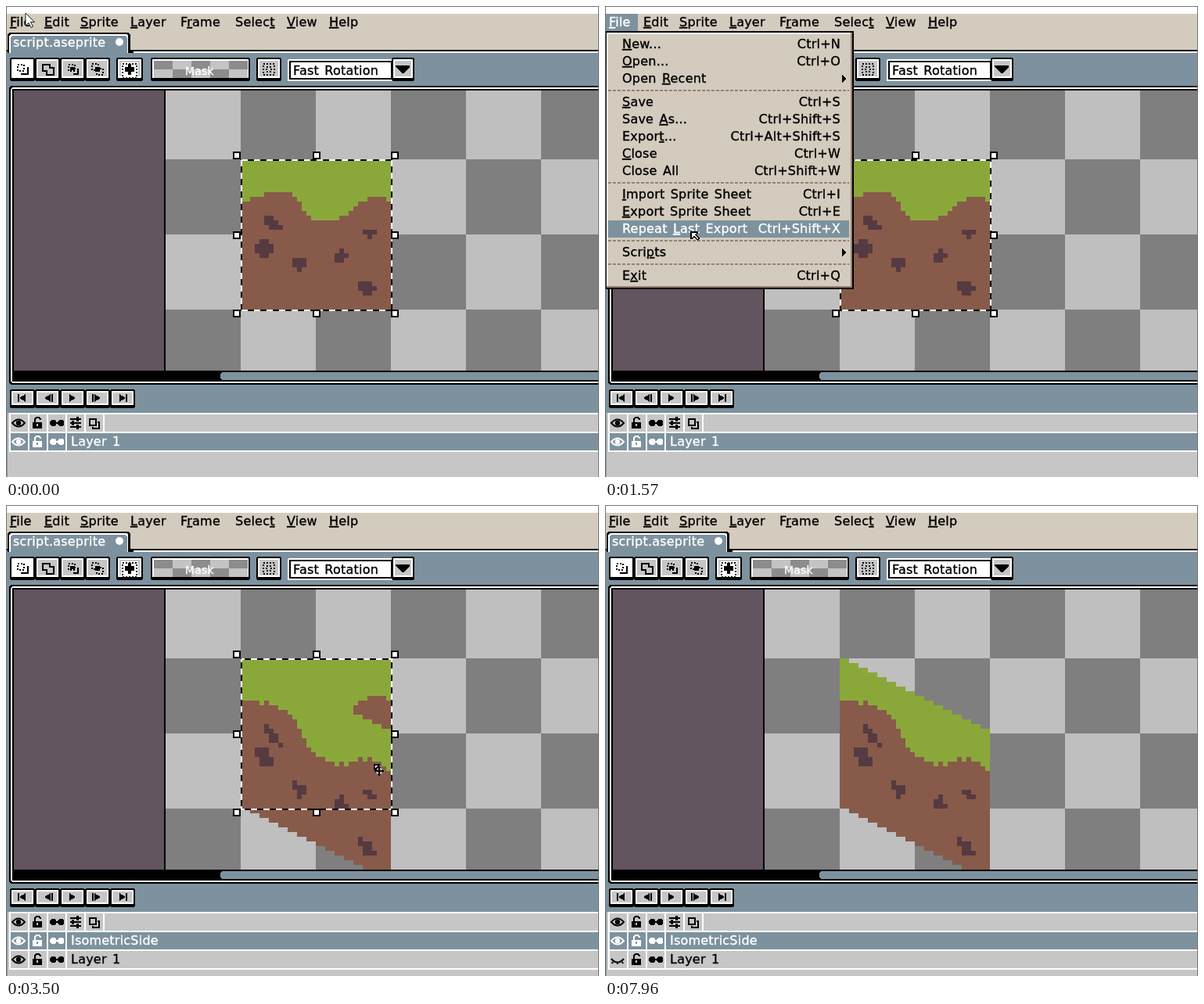
Animation of 758x602 px, one loop 9710 ms. Source, as an HTML page:

```html
<!DOCTYPE html>
<html lang="en">
<head>
<meta charset="utf-8">
<title>Isometric script</title>
<style>
html, body { margin: 0; width: 100%; height: 100%; overflow: hidden; background: #7d929e; }
svg { display: block; width: 758px; height: 602px; shape-rendering: crispEdges; }
text {
  font: 16px "DejaVu Sans", sans-serif; letter-spacing: .22px; word-spacing: 2px;
  white-space: pre; fill: #000; stroke: #000; stroke-width: .35px;
}
.w, .hot text { fill: #fff; stroke: #fff; }
.u { text-decoration: underline; }
.item rect { fill: none; }
.item path { fill: #000; }
.hot rect { fill: #7d929e; }
.hot path { fill: #fff; }
.smooth { shape-rendering: geometricPrecision; }
.cell { fill: #c6c6c6; }
.active .cell { fill: #7d929e; }
.cell.over { fill: #dedede; }
.active .cell.over { fill: #9bb0bb; }
</style>
</head>
<body>
<svg id="stage" viewBox="0 0 758 602" xmlns="http://www.w3.org/2000/svg"></svg>
<script>
const LOOP = 9710;
const BLUE = '#7d929e', BEIGE = '#d3cbbe', GRAY = '#c6c6c6', BROWN = '#968275';
const GRASS = '#8aa83a', DIRT = '#885a4a', STONE = '#563a41';

// Moments of the story, in ms
const MENU = 400, SUBMENU = 2010, RUN = 3370, DESELECT = 5240, HIDE = 7220;

const rect = (x, y, w, h, fill, more = '') =>
  `<rect x="${x}" y="${y}" width="${w}" height="${h}" fill="${fill}" ${more}/>`;
const path = (d, fill = '#000', more = '') => `<path d="${d}" fill="${fill}" ${more}/>`;
const line = (d, color = '#000', more = '') =>
  path(d, 'none', `stroke="${color}" stroke-width="2" ${more}`);
const group = (id, body, more = '') => `<g id="${id}" ${more}>${body}</g>`;
const range = n => [...Array(n).keys()];
const smooth = u => u * u * (3 - 2 * u);

// Value at k along key points [k, ...values]
function along(keys, k, ease = u => u) {
  const i = keys.findIndex(p => p[0] > k);
  if (i < 0) return keys.at(-1).slice(1);
  const a = keys[i - 1], b = keys[i], u = ease((k - a[0]) / (b[0] - a[0]));
  return a.slice(1).map((v, j) => v + (b[j + 1] - v) * u);
}

// "&" marks the underlined letter
function label(x, y, str, more = '') {
  const body = str.replace(/&(.)/, '<tspan class="u">$1</tspan>');
  return `<text x="${x}" y="${y}" ${more}>${body}</text>`;
}

const button = (x, y, w, h, face = GRAY) =>
  rect(x, y, w, h, '#000', 'rx="3"') + rect(x + 2, y + 2, w - 4, h - 6, '#fff') +
  rect(x + 4, y + 4, w - 8, h - 10, face);

const dots = (x, y, s) => rect(x + 1, y + 1, s - 2, s - 2, 'none',
  'stroke="#000" stroke-width="2" stroke-dasharray="2 2"');

function topBar() {
  const names = [[5, '&File'], [49, '&Edit'], [95, '&Sprite'], [159, '&Layer'],
    [223, 'F&rame'], [293, 'Selec&t'], [359, '&View'], [413, '&Help']];
  return rect(0, 0, 758, 10, '#fff') + rect(0, 10, 758, 46, BEIGE) +
    rect(0, 56, 758, 2, '#000') + rect(160, 58, 598, 2, '#fff') +
    names.map(([x, s]) => label(x, 26, s)).join('') +
    path('M2 60V36l2-2h152l3 3v21h4v2z') +
    path('M4 60V38l2-2h148l2 2v22z', '#fff') + path('M6 62V40l2-2h144l3 3v21z', BLUE) +
    label(9, 52, 'script.aseprite', 'class="w"') +
    '<circle cx="145" cy="46" r="5" fill="#fff" class="smooth"/>';
}

function toolBar() {
  const mask = range(10).map(i => {
    const c = i % 5, r = Math.floor(i / 5);
    return rect(189 + c * 24, 70 + r * 11, 24, 11, (c + r) % 2 ? '#c4c4c4' : '#8c8c8c');
  });
  return range(4).map(i => button(5 + 32 * i, 66, 32, 30, i ? GRAY : '#fff')).join('') +
    dots(14, 74, 10) + line('M28 78v9h-9') +
    line('M47 75h9v4h5v9h-9v-5h-5z') +
    dots(79, 74, 10) + line('M86 87h6v-7') + rect(82, 78, 6, 4, '#000') +
    dots(109, 73, 10) + dots(115, 79, 10) + rect(114, 78, 6, 6, '#000') +
    button(141, 66, 34, 30) + rect(147, 72, 22, 18, '#fff') + dots(148, 73, 20) +
    path('M156 74h4v4h4v6h-4v4h-4v-4h-4v-6h4z') +
    button(185, 66, 127, 30) + mask.join('') +
    label(229, 88, 'Mask', 'class="w" style="font-size:14px"') +
    button(320, 66, 32, 30) + dots(328, 73, 16) + dots(332, 77, 8) +
    rect(360, 68, 136, 28, '#fff', 'rx="2"') + rect(362, 70, 132, 24, '#000') +
    rect(364, 72, 128, 20, '#fff') + label(367, 88, 'Fast Rotation') +
    button(493, 66, 29, 30) + path('M498 76h18v2l-8 8h-2l-8-8z');
}

const CELL = 6, SIZE = 32, LEFT = 300, TOP = 196;
// Rolling grass edge: column, depth
const HILLS = [[0, 9], [6, 7], [9, 7], [16, 13], [19, 13], [28, 8], [30, 8], [31, 9]];
// Ellipses: centre, radii, slant
const STONES = [[6.15, 13, 1.6, 1.6, .8], [4.5, 18.5, 2, 2, 0], [12, 21.9, 1.6, 1.25, 0],
  [20.9, 20.15, 1.3, 1.35, 0], [27, 15.2, 1.3, 1, 0], [26.4, 27, 1.8, 1.34, .3]];

const isStone = (c, r) => STONES.some(([x, y, a, b, s]) =>
  ((c - x - s * (r - y)) / a) ** 2 + ((r - y) / b) ** 2 < 1);

function soil(slope) {
  return range(SIZE).map(c => {
    const drop = Math.floor(c * slope), depth = Math.round(along(HILLS, c, smooth)[0]);
    const bar = (r, h, fill) =>
      rect(LEFT + c * CELL, TOP + (r + drop) * CELL, CELL, h * CELL, fill);
    return bar(0, depth, GRASS) + bar(depth, SIZE - depth, DIRT) +
      range(SIZE).map(r => isStone(c, r) ? bar(r, 1, STONE) : '').join('');
  }).join('');
}

function editor() {
  const checks = range(24).map(i => {
    const c = i % 6, r = Math.floor(i / 6);
    return rect(204 + c * 96, 100 + r * 96, 96, 96, (c + r) % 2 ? '#7f7f7f' : '#bfbfbf');
  });
  return path('M4 104l2-2H758V484H6l-2-2z') + path('M6 106l2-2H758V482H8l-2-2z', '#fff') +
    rect(8, 106, 750, 374, '#000') +
    '<clipPath id="view"><rect x="10" y="108" width="748" height="358"/></clipPath>' +
    '<g clip-path="url(#view)">' + rect(10, 108, 192, 358, '#62555f') + checks.join('') +
    group('flat', soil(0)) + group('slanted', soil(.5)) + '</g>' +
    path('M274 470l2-2H758v10H276l-2-2z', BLUE);
}

function selection() {
  const knobs = [295, 397, 497].flatMap(x => [191, 293, 393].map(y =>
    x === 397 && y === 293 ? '' : rect(x - 5, y - 5, 10, 10, '#000') + rect(x - 3, y - 3, 6, 6, '#fff')));
  return line('M301 197H493V389H301z') +
    line('M301 197H493V389M301 197V389H493', '#fff', 'id="ants" stroke-dasharray="8 8"') + knobs.join('');
}

const eye = (y, c) => '<g class="smooth">' +
  line(`M8 ${y}q8-9 16 0q-8 9-16 0z`, c) + `<circle cx="16" cy="${y}" r="3.2" fill="${c}"/></g>`;
const lash = (y, c) => line(`M8 ${y - 1}q8 9 16 0M10 ${y + 3}l-1 2M16 ${y + 4}v2M22 ${y + 3}l1 2`, c, 'class="smooth"');
const lock = (y, c) => rect(34, y - 1, 12, 8, c) +
  line(`M37 ${y - 1}v-4l2-2h3l2 2v1`, c) + rect(39, y + 1, 2, 3, c === '#fff' ? BLUE : GRAY);
const link = (y, c) => [56, 66].map(x => path(`M${x} ${y - 2}l2-2h4l2 2v4l-2 2h-4l-2-2z`, c)).join('') +
  rect(62, y - 1, 6, 2, c);

function layer(id, y, name, active) {
  const c = active ? '#fff' : '#000', mid = y + 11;
  const cells = range(4).map(i =>
    `<rect class="cell" x="${6 + 24 * i}" y="${y}" width="${i < 3 ? 22 : 680}" height="22"/>`);
  return group(id, rect(4, y - 2, 754, 26, '#fff') + cells.join('') +
    `<g class="open">${eye(mid, c)}</g><g class="shut">${lash(mid, c)}</g>` +
    lock(mid, c) + link(mid, c) + label(83, y + 16, name, active ? 'class="w"' : ''),
    active ? 'class="active"' : '');
}

// Five transport buttons: arrow plus a bar, mirrored around plain play
function transport() {
  return range(5).map(i => {
    const x = 21 + 32 * i, dir = i < 2 ? -1 : 1;
    const bar = i === 2 ? '' : rect(x + dir * (i % 4 ? -6 : 5) - 1, 496, 2, 10, '#000');
    return button(x - 16, 490, 32, 24) + path(`M${x - 4 * dir} 496l${8 * dir} 5l${-8 * dir} 5z`) + bar;
  }).join('');
}

function timeline() {
  const sliders = range(3).map(i =>
    line(`M82 ${528 + 5 * i}h14`) + rect(i === 1 ? 84 : 90, 525 + 5 * i, 3, 6, '#000'));
  return transport() + rect(2, 520, 756, 82, GRAY) +
    [520, 544].map(y => rect(4, y, 754, 2, '#fff')).join('') +
    range(6).map(i => rect(4 + 24 * i, 520, 2, 26, '#fff')).join('') +
    eye(533, '#000') + lock(533, '#000') + link(533, '#000') + sliders.join('') +
    line('M107 528h8v8h-8zM117 532h2v8h-8v-2') +
    layer('only', 546, 'Layer 1', true) +
    group('both', layer('side', 546, 'IsometricSide', true) + layer('base', 570, 'Layer 1', false));
}

// 0 is a separator, ">" opens a submenu
const FILE_ITEMS = [['&New...', 'Ctrl+N'], ['&Open...', 'Ctrl+O'], ['Open &Recent', '>'], 0,
  ['&Save', 'Ctrl+S'], ['Save &As...', 'Ctrl+Shift+S'], ['Expor&t...', 'Ctrl+Alt+Shift+S'],
  ['&Close', 'Ctrl+W'], ['Close All', 'Ctrl+Shift+W'], 0,
  ['&Import Sprite Sheet', 'Ctrl+I'], ['&Export Sprite Sheet', 'Ctrl+E'],
  ['Repeat &Last Export', 'Ctrl+Shift+X'], 0, ['Scri&pts', '>'], 0, ['E&xit', 'Ctrl+Q']];
const SCRIPT_ITEMS = [['square-to-isometric-front'], ['square-to-isometric-side'],
  ['square-to-isometric-tile'], 0, ['&Open Scripts Folder'], ['&Rescan Scripts Folder', 'F5']];

function popup(id, x, y, w, h, items) {
  let row = y + 6;
  const right = x + w - 17;
  const body = items.map(item => {
    if (!item) {
      row += 8;
      return line(`M${x + 4} ${row - 4}H${x + w - 6}`, BROWN, 'stroke-dasharray="4 2"');
    }
    const [name, key = ''] = item, top = row;
    row += 22;
    return `<g class="item" data-top="${top}">` +
      `<rect x="${x + 4}" y="${top}" width="${w - 10}" height="22"/>` + label(x + 22, top + 16, name) +
      (key === '>' ? `<path d="M${right + 2} ${top + 6}l5 5l-5 5z"/>`
        : label(right, top + 16, key, 'text-anchor="end"')) + '</g>';
  });
  return group(id, rect(x, y, w, h, '#000') + rect(x + 2, y + 2, w - 4, h - 4, BROWN) +
    rect(x + 2, y + 2, w - 6, h - 6, '#fff') + rect(x + 4, y + 4, w - 8, h - 8, BEIGE) + body.join(''));
}

function pointers() {
  const arrow = path('M0 0h10v2l-2 3l4 4l-3 3l-4-4l-3 2h-2z') + path('M2 2h6l-2 3l4 4l-1 1l-4-4l-3 2z', '#fff');
  const cross = path('M7 2l3 3h-2v3h3v-2l3 3l-3 3v-2h-3v3h2l-3 3l-3-3h2v-3h-3v2l-3-3l3-3v2h3v-3h-2z',
    '#000', 'stroke="#fff" paint-order="stroke" class="smooth"');
  return group('pointer',
    group('system', path('M0 0v16l4-3.5l3 6l2.5-1.2l-3-5.8h5z', '#fff', 'stroke="#222" class="smooth"')) +
    group('arrow', arrow) + group('move', cross + path('M0 0h8v2l-3 2l-1 4h-4z') + path('M2 2h3l-3 4z', '#fff')));
}

document.getElementById('stage').innerHTML =
  rect(0, 0, 758, 602, BLUE) + topBar() + toolBar() + editor() + group('select', selection()) + timeline() +
  group('menu', rect(0, 34, 758, 22, BEIGE) +
    rect(1, 10, 41, 22, BLUE) + label(5, 26, '&File', 'class="w"') +
    popup('file', 0, 32, 318, 330, FILE_ITEMS)) +
  popup('scripts', 316, 298, 270, 130, SCRIPT_ITEMS) +
  rect(.5, .5, 757, 602, 'none', 'stroke="#777"') + pointers();

// Pointer stops: step, x, y
const STOPS = [[0, 25, 9], [6, 28, 24], [9, 101, 219], [13, 112, 311], [15, 114, 314],
  [17, 221, 323], [20, 470, 331], [27, 470, 331], [32, 111, 585], [33, 112, 590],
  [34, 229, 485], [36, 268, 432], [41, 268, 432], [42, 20, 592], [43, 20, 620],
  [48, 0, 620], [51, 10, 576], [56, 10, 576], [57, 213, 592], [60, 350, 604]];

const $ = id => document.getElementById(id);
const all = (q, fn) => document.querySelectorAll(q).forEach(fn);
const show = (el, on) => { el.style.display = on ? '' : 'none'; };

function update(t) {
  // The screen refreshes about every 133 ms
  const step = Math.floor(t / 133 + .3);
  const [x, y] = along(STOPS, step).map(Math.round);
  const menu = t >= MENU && t < RUN, sub = t >= SUBMENU && t < RUN, done = t >= RUN;
  const selected = t < DESELECT, hidden = t >= HIDE;

  show($('menu'), menu);
  show($('scripts'), sub);
  show($('select'), selected);
  show($('slanted'), done);
  show($('flat'), !hidden);
  show($('only'), !done);
  show($('both'), done);
  all('.open', el => show(el, !hidden || !el.closest('#base')));
  all('.shut', el => show(el, hidden && el.closest('#base')));

  const within = el => y >= +el.dataset.top && y < +el.dataset.top + 22;
  all('#file .item', el => el.classList.toggle('hot', sub ? el.dataset.top === '304' : within(el)));
  all('#scripts .item', el => el.classList.toggle('hot', x > 320 && within(el)));
  all('#both .cell', el => {
    const dx = x - el.getAttribute('x'), dy = y - el.getAttribute('y');
    el.classList.toggle('over', dx >= 0 && dx < +el.getAttribute('width') && dy >= 0 && dy < 22);
  });

  $('ants').setAttribute('stroke-dashoffset', 2 * Math.floor(step * 1.33));

  const grab = done && selected && x > LEFT && x < 492 && y > TOP && y < 388;
  show($('system'), t < MENU);
  show($('arrow'), t >= MENU && !grab);
  show($('move'), grab);
  $('pointer').setAttribute('transform', `translate(${x} ${y})`);
}

function tick() {
  update(performance.now() % LOOP);
  requestAnimationFrame(tick);
}
tick();
</script>
</body>
</html>
```
